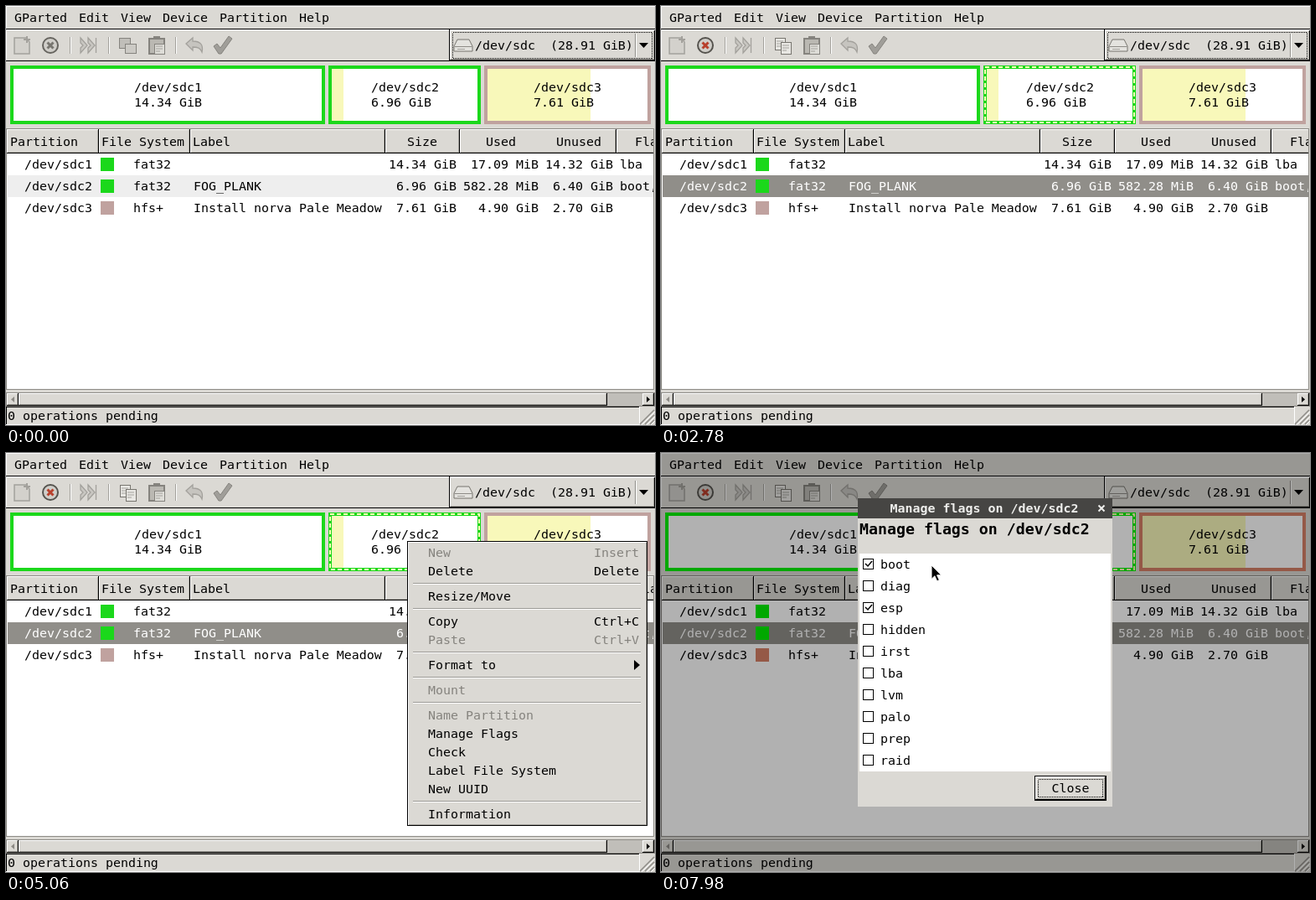
Write an HTML page that moves like this. It is 775x500 px and loops after 8 s.

```html
<!DOCTYPE html>
<html lang="en">
<head>
<meta charset="utf-8">
<title>Partition editor</title>
<style>
html, body { margin: 0; width: 775px; height: 500px; overflow: hidden; background: #dbd9d4; }
svg { position: absolute; left: 0; top: 0; width: 775px; height: 500px; }
text { font: 14.95px "DejaVu Sans Mono", monospace; white-space: pre; }
.b { font-weight: bold; }
.h { font-weight: bold; font-size: 18.25px; }
rect { shape-rendering: crispEdges; }
</style>
</head>
<body>
<svg id="main" viewBox="0 0 775 500"></svg>
<svg id="top" viewBox="0 0 775 500"></svg>
<script>
const LOOP = 8000, BG = '#dbd9d4', DIM = 0.694;
const $ = id => document.getElementById(id);
const LABEL = 'FOG_PLANK';

// Drawing helpers: all return SVG markup; text is placed by its vertical centre.
const box = (x, y, w, h, fill, more = '') =>
  `<rect x="${x}" y="${y}" width="${w}" height="${h}" fill="${fill}" ${more}/>`;
const frame = (x, y, w, h, stroke, more = '') =>
  box(x + .5, y + .5, w - 1, h - 1, 'none', `stroke="${stroke}" ${more}`);
const text = (x, cy, s, fill = '#000', more = '') =>
  `<text x="${x}" y="${cy + 5}" fill="${fill}" ${more}>${s}</text>`;
const right = (x, cy, s, fill) => text(x, cy, s, fill, 'text-anchor="end"');
const mid = (x, cy, s, fill, more = '') => text(x, cy, s, fill, 'text-anchor="middle" ' + more);
const path = (d, stroke, width = 1, fill = 'none', more = '') =>
  `<path d="${d}" stroke="${stroke}" stroke-width="${width}" fill="${fill}" ${more}/>`;
const group = (id, body, more = '') => `<g id="${id}" ${more}>${body}</g>`;
const raised = (x, y, w, h, fill = BG, id = '') =>
  box(x, y, w, h, '#000') + box(x, y, w - 1, h - 1, '#fff') +
  box(x + 1, y + 1, w - 2, h - 2, '#aaa8a2') +
  box(x + 1, y + 1, w - 3, h - 3, fill, id && `id="${id}"`);
const dotted = (x, y, w, h) => frame(x, y, w, h, '#000', 'stroke-dasharray="1 1"');
const cross = (x, y, r, color, w) =>
  path(`M${x - r} ${y - r}l${2 * r} ${2 * r}m0 ${-2 * r}l${-2 * r} ${2 * r}`, color, w);

function toolbar() {
  const grey = '#a3a19c', mark = '#85837e';
  const sheet = (x, y) => box(x, y, 12, 14, '#e8e7e3', 'stroke="#77756f"') +
    path(`M${x + 2} ${y + 4}h8m-8 3h8m-8 3h5`, '#a5a39e');
  const board = path('M171 39h18v18h-18z', mark, 2, '#bab8b2') +
    box(176, 36, 8, 4, mark) + box(177, 45, 12, 12, '#deddd8', `stroke="${mark}"`) +
    path('M179 48h8m-8 3h8m-8 3h5', grey);
  const stop = (ring, x) =>
    `<circle cx="53" cy="47" r="9" fill="#d0cec9" stroke="${ring}" stroke-width="2"/>` +
    cross(53, 47, 3.5, x, 3);
  return path('M10 38h14l4 5v14h-18z', grey, 1.5, '#d3d1cc') +
    path('M25 36v8m-4-4h8', grey, 2) +
    group('stopOff', stop('#66645f', '#77756f')) + group('stopOn', stop('#55534e', '#b8402c')) +
    path('M76.5 37v20M122.5 37v20M202.5 37v20', grey) +
    path('M77.5 37v20M123.5 37v20M203.5 37v20', '#fff') +
    path('M89 38l8 9-8 9v-6l3-3-3-3zM98 38l8 9-8 9v-6l3-3-3-3zM107.500 38v18', grey, 1.3, '#c9c7c2') +
    group('copyOff', box(135, 38, 13, 12, '#c0beb9', `stroke="${mark}"`) +
      box(142, 45, 13, 11, '#cccac5', `stroke="${mark}"`)) +
    group('copyOn', sheet(136, 38) + sheet(143, 43)) + board +
    path('M215 45l8-7v4c9 0 13 4 11 13-2-5-5-6-11-6v4z', grey, 1.3, '#c6c4bf') +
    path('M248 48l4-3 4 5 10-14 4 3-13 18h-3z', mark, 1, '#a09e99') +
    // disk and device selector
    path('M529.500 28v38', '#000') + raised(530, 29, 245, 36) +
    path('M539 40h14l4 8v6h-22v-6z', '#77756f', 1, '#e4e3df') +
    path('M535.500 48.500h21', '#8d8b86') + path('M539 51.500h9', '#a5a39e') +
    text(560, 47, '/dev/sdc  (28.91 GiB)') +
    path('M751.500 33v28', '#8d8b86') + path('M752.500 33v28', '#fff') +
    path('M756 44h11l-5.500 6z', 'none', 0, '#000') +
    group('focus', dotted(533, 31, 239, 32));
}

function disk(x, w, color, used, name, size, tx) {
  return box(x, 71, w, 70, color) + box(x + 4, 75, w - 8, 62, '#fff') +
    box(x + 4, 75, used, 62, '#f8f8ba') + text(tx, 97, name) + text(tx, 115, size);
}

function row(i, color, fs, label, size, used, unused, flags, ink = '#000') {
  const y = 189 + 26 * i;
  return text(22, y, '/dev/sdc' + (i + 1), ink) + box(113, y - 8, 16, 16, color) +
    text(152, y, fs, ink) + text(224, y, label, ink) + right(538, y, size, ink) +
    right(636, y, used, ink) + right(725, y, unused, ink) + text(733, y, flags, ink);
}

function mainWindow() {
  const G = 'var(--g)', H = 'var(--h)';
  const win = ink => row(1, G, 'fat32', LABEL, '6.96 GiB', '582.28 MiB', '6.40 GiB', 'boot, esp', ink);
  let s = box(0, 0, 775, 500, BG);
  s += box(0, 0, 775, 1, '#fff') + box(0, 0, 1, 66, '#fff');
  [['GParted', 10], ['Edit', 87], ['View', 137], ['Device', 187], ['Partition', 255], ['Help', 350]]
    .forEach(([n, x]) => s += text(x, 14, n));
  s += box(0, 27, 775, 1, '#000') + box(0, 28, 775, 1, '#fff') + toolbar() + box(0, 65, 775, 1, '#000');
  s += disk(5, 376, G, 0, '/dev/sdc1', '14.34 GiB', 153) +
    disk(385, 182, G, 14, '/dev/sdc2', '6.96 GiB', 436) +
    disk(571, 199, H, 123, '/dev/sdc3', '7.61 GiB', 630);
  s += group('dash', box(387, 73, 178, 66, 'none',
    'stroke="#ffffb8" stroke-width="2" stroke-dasharray="5 3"'));
  // partition list
  s += box(0, 146, 775, 312, '#8d8b86') + box(1, 147, 773, 310, '#fff');
  const edges = [1, 111, 220, 453, 542, 729, 800];
  for (let i = 0; i < 6; i++) s += raised(edges[i], 147, edges[i + 1] - edges[i], 29);
  s += text(5, 162, 'Partition') + text(114, 162, 'File System') + text(223, 162, 'Label') +
    mid(497, 162, 'Size') + mid(591, 162, 'Used') + mid(684, 162, 'Unused') + text(751, 162, 'Flags');
  s += row(0, G, 'fat32', '', '14.34 GiB', '17.09 MiB', '14.32 GiB', 'lba');
  s += group('rowOff', box(2, 202, 772, 26, '#eee') + win('#000'));
  s += group('rowOn', box(2, 202, 772, 26, '#908e89') + win('#fff'));
  s += row(2, H, 'hfs+', 'Install norva Pale Meadow', '7.61 GiB', '4.90 GiB', '2.70 GiB', '');
  s += box(773, 147, 1, 311, '#8d8b86') + box(774, 146, 1, 312, BG);
  // scrollbar and status bar
  s += box(0, 461, 775, 17, '#8d8b86') + box(1, 462, 773, 15, '#c0beb9') +
    raised(1, 462, 14, 15) + raised(15, 462, 703, 15) + raised(760, 462, 14, 15);
  s += path('M10 466v7l-4-3.500z', 'none', 0, '#8d8b86') + path('M765 466v7l4-3.500z', 'none', 0, '#000');
  s += box(0, 478, 757, 1, '#000') + box(0, 478, 1, 22, '#000') + box(756, 478, 1, 22, '#fff') +
    box(0, 499, 757, 1, '#fff') + text(2, 489, '0 operations pending');
  s += path('M757 499l17-17m-11 17l11-11m-5 11l5-5', '#8d8b86', 1.5) +
    path('M759 500l16-16m-10 16l10-10m-5 10l5-5', '#fff');
  return s;
}

// name, centre from menu top, shortcut, disabled
const ITEMS = [
  ['New', 14, 'Insert', 1], ['Delete', 36, 'Delete'], ['Resize/Move', 66], ['Copy', 96, 'Ctrl+C'],
  ['Paste', 118, 'Ctrl+V', 1], ['Format to', 148], ['Mount', 178, '', 1], ['Name Partition', 208, '', 1],
  ['Manage Flags', 230], ['Check', 252], ['Label File System', 274], ['New UUID', 296], ['Information', 326]
];
function menu() {
  let s = box(0, 0, 287, 340, '#000') + box(1, 1, 285, 338, '#fff') +
    box(2, 2, 284, 337, '#aaa8a2') + box(2, 2, 283, 336, BG);
  s += group('bar', box(2, 0, 283, 22, '#2a2ad0'));
  for (const y of [51, 81, 133, 163, 193, 311])
    s += box(7, y - 1, 272, 1, '#9b9994') + box(7, y, 272, 1, '#fff');
  for (const [name, y, key = '', off] of ITEMS) {
    const ink = off ? '#85837e' : '#000';
    s += `<g class="item" fill="${ink}">` + text(25, y, name, 'inherit') + right(277, y, key, 'inherit') + '</g>';
  }
  return s + path('M271 142v12l7-6z', 'none', 0, '#000');
}

const titleBar = (x, y, w) => box(x, y, w, 24, '#464543') + cross(x + w - 13, y + 12, 3.5, '#eeeeec', 2);

function labelDialog() {
  return box(237, 186, 300, 104, BG) + titleBar(237, 186, 300) +
    text(242, 198, 'Set file system label on /dev…', '#eeeeec', 'class="b"') +
    text(244, 230, 'Label:', '#000', 'class="b"') +
    box(308, 217, 188, 26, '#fff') + box(308, 217, 187, 25, '#000') + box(310, 219, 185, 23, '#fff') +
    box(311, 221, 82, 18, '#2a2ad0') + text(312, 230, LABEL, '#fff') +
    raised(354, 253, 85, 30) + mid(396, 268, 'Cancel') +
    box(445, 253, 85, 30, '#000') + raised(446, 254, 83, 28, BG, 'ok') + mid(487, 268, 'OK');
}

function flagsDialog() {
  const flags = ['boot', 'diag', 'esp', 'hidden', 'irst', 'lba', 'lvm', 'palo', 'prep', 'raid'];
  let s = box(235, 54, 304, 368, BG) + titleBar(235, 54, 304) +
    mid(386, 66, 'Manage flags on /dev/sdc2', '#eeeeec', 'class="b"') +
    text(237, 92, 'Manage flags on /dev/sdc2', '#000', 'class="h"') + box(237, 120, 300, 260, '#fff');
  flags.forEach((f, i) => {
    const y = 133 + 26 * i;
    s += frame(241, y - 7, 13, 13, '#000') + text(262, y, f);
    if (f === 'boot' || f === 'esp') s += path(`M244 ${y - 1}l3 3 5-6`, '#000', 1.5);
  });
  return s + box(446, 385, 86, 30, '#000') + raised(447, 386, 84, 28) +
    dotted(450, 389, 78, 22) + mid(489, 400, 'Close');
}

$('main').innerHTML = mainWindow();
$('top').innerHTML = group('menu', menu()) + group('dlgLabel', labelDialog()) +
  group('dlgFlags', flagsDialog()) +
  group('click', '<circle r="9.800" fill="#2bd3d8"/><circle id="hole" r="3.800" fill="#d8eeee"/>') +
  group('cursor', path('M0 0V16.500l3.800-3.700 2.800 6 2.800-1.200-2.800-5.800h5.200z', '#fff', 1, '#000'));

// Timeline helpers
const within = (t, a, b) => t >= a && t < b;
const ramp = (t, a, b) => Math.min(1, Math.max(0, (t - a) / (b - a)));
const show = (id, on) => $(id).style.display = on ? '' : 'none';
const latest = (t, steps) => steps.reduce((v, s) => t >= s[0] ? s[1] : v, -1);
function along(t, pts) {
  let p = pts[0].slice(1);
  for (let i = 1; i < pts.length; i++) {
    const [a, x, y] = pts[i - 1], [b, u, v] = pts[i];
    if (t >= a) { const k = ramp(t, a, b); p = [x + (u - x) * k, y + (v - y) * k]; }
  }
  return p;
}

const HOVER = [[1400, 3], [1550, 5], [1630, -1], [1690, 8], [1780, 9], [1970, 10], [2660, -1],
  [5420, 3], [5540, 5], [5660, -1], [6030, 8], [6300, -1]];
// start, fade start, end, hole, path
const CLICKS = [
  [800, 900, 1120, 0, [[0, 460, 211]]],
  [3520, 4400, 4520, 1, [[3520, 490, 248], [3880, 482, 268]]],
  [5120, 5200, 5400, 0, [[0, 479, 211]]],
  [6300, 6330, 6560, 0, [[0, 557, 341]]]
];
const POINTER = [[6540, 557, 341], [7100, 320, 154], [7140, 320, 154], [7300, 309, 142],
  [7440, 309, 142], [7560, 318, 138], [7820, 318, 138], [7980, 323, 134]];

function squash(id, k) {
  show(id, k > 0);
  $(id).setAttribute('transform', `translate(0 238) scale(1 ${k}) translate(0 -238)`);
}

function render(t) {
  const picked = t >= 720, first = within(t, 720, 2660), second = within(t, 5020, 6300);
  const k = 1 - (1 - DIM) * (ramp(t, 2900, 3200) - ramp(t, 4265, 4540) + ramp(t, 6740, 7060));
  const main = $('main').style, dark = k < 1;
  main.filter = dark ? `brightness(${k})` : 'none';
  // These two keep a fixed shade whenever the window is dimmed.
  const shade = (r, g, b) => `rgb(${r / k},${g / k},${b / k})`;
  main.setProperty('--g', dark ? shade(0, 168, 0) : '#1bd81b');
  main.setProperty('--h', dark ? shade(149, 89, 71) : '#c0a29f');

  for (const id of ['stopOn', 'copyOn', 'rowOn', 'dash']) show(id, picked);
  for (const id of ['stopOff', 'copyOff', 'rowOff']) show(id, !picked);
  show('focus', t < 720 || within(t, 2660, 2860) || within(t, 4460, 5020) || within(t, 6300, 6700));

  show('menu', first || second);
  $('menu').setAttribute('transform', second ? 'translate(479 105)' : 'translate(460 110)');
  const hot = latest(t, HOVER);
  show('bar', hot >= 0);
  if (hot >= 0) $('bar').setAttribute('transform', `translate(0 ${ITEMS[hot][1] - 11})`);
  document.querySelectorAll('.item').forEach((el, i) =>
    el.setAttribute('fill', i === hot ? '#fff' : ITEMS[i][3] ? '#85837e' : '#000'));

  squash('dlgLabel', ramp(t, 2860, 3100) - ramp(t, 4160, 4375));
  squash('dlgFlags', ramp(t, 6700, 6940));
  $('ok').setAttribute('fill', within(t, 3370, 3640) ? BG : '#ebeae6');

  const c = CLICKS.find(c => within(t, c[0], c[2]));
  show('click', c);
  if (c) {
    $('click').setAttribute('transform', `translate(${along(t, c[4])})`);
    $('click').setAttribute('opacity', 1 - ramp(t, c[1], c[2]));
    show('hole', c[3]);
  }
  show('cursor', t >= 6300);
  $('cursor').setAttribute('transform', `translate(${along(t, POINTER)})`);
}

const start = performance.now();
function tick() {
  render((performance.now() - start) % LOOP);
  requestAnimationFrame(tick);
}
tick();
</script>
</body>
</html>
```
